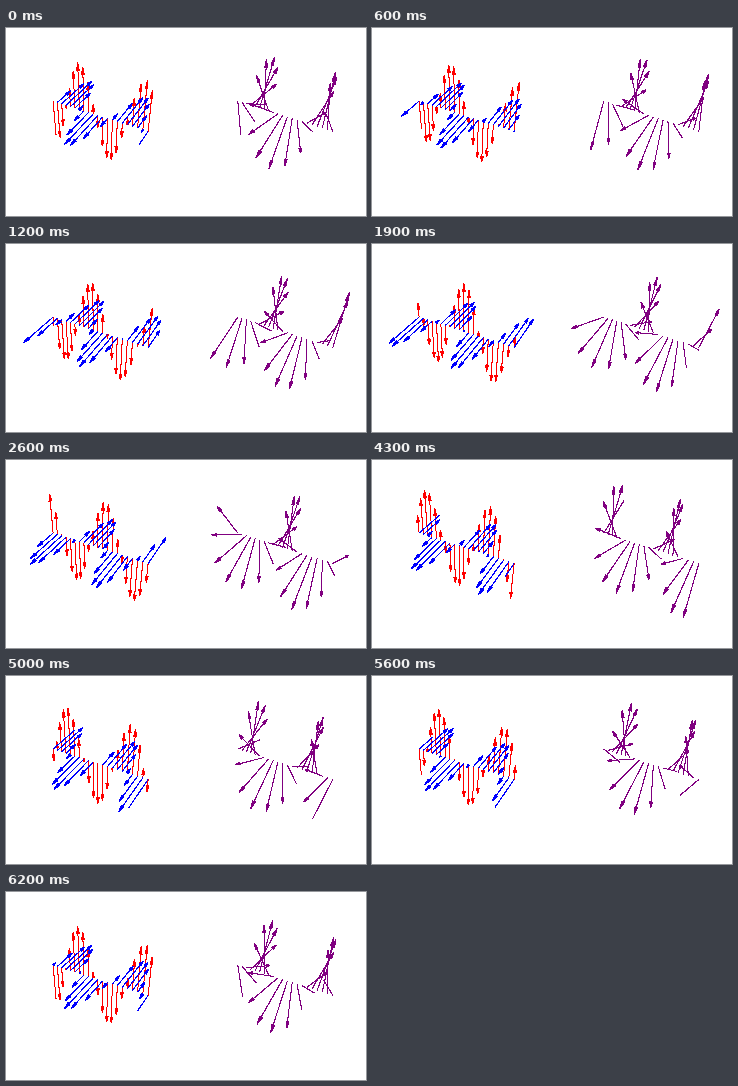
Recreate the animation shown at these times as a matplotlib script. Size 360 by 188 pixels, loop 6300 ms.

```python
import numpy as np
import matplotlib.pyplot as plt
from matplotlib.animation import FuncAnimation
from matplotlib.collections import PolyCollection

W, H, DPI = 360, 188, 100
FRAMES, INTERVAL = 63, 100
STATIONS = np.arange(0, 10.01, 0.5)
EYE = np.array([1.3, -2.4, 2.0])
SCALE = 364.5
LEFT, RIGHT, MIDDLE = 91.9, 276.6, 87.4
HEAD, HEAD_HALF = 0.145, 1.3
# Unsmoothed fills cover every pixel they touch, so a sliver is one pixel wide
SHAFT_HALF = 0.01

# Camera looking at the centre of a unit cube
DISTANCE = np.linalg.norm(EYE)
FORWARD = -EYE / DISTANCE
SIDE = np.cross(FORWARD, [0, 0, 1])
SIDE /= np.linalg.norm(SIDE)
UP = np.cross(SIDE, FORWARD)


def project(s, y, z, cx):
    p = np.array([s / 10 - 0.5, y / 2, z / 2])
    k = SCALE / (DISTANCE + FORWARD @ p)
    return np.array([cx + k * (SIDE @ p), MIDDLE - k * (UP @ p)])


def head_shown(s, y, z):
    # Heads on the two end faces are clipped when they lean out of the box
    if s == STATIONS[0] and y - z > 0.3:
        return False
    if s == STATIONS[-1] and y < -0.3 and z > y:
        return False
    # Heads pointing away from the eye are seen edge-on
    return not (y > 0.27 and z < -0.5)


def arrow(s, y, z, cx):
    """Polygons of the arrow standing at station s."""
    size = np.hypot(y, z)
    back = max(0, 1 - HEAD / max(size, 1e-9))
    tail = project(s, 0, 0, cx)
    neck = project(s, back * y, back * z, cx)
    tip = project(s, y, z, cx)
    d = tip - neck
    n = np.array([-d[1], d[0]]) / max(np.hypot(*d), 1e-9)
    a, b = n * SHAFT_HALF, n * HEAD_HALF * min(1, size / HEAD)
    parts = [[tail + a, neck + a, neck - a, tail - a]]
    if head_shown(s, y, z):
        parts.append([tip, neck + b, neck - b])
    return parts


fig = plt.figure(figsize=(W / DPI, H / DPI), dpi=DPI, facecolor="white")
ax = fig.add_axes([0, 0, 1, 1])
ax.set_xlim(0, W)
ax.set_ylim(H, 0)
ax.axis("off")


def arrows(color):
    group = PolyCollection([], facecolors=color, edgecolors="none",
                           linewidths=0, antialiaseds=False, snap=False)
    ax.add_collection(group, autolim=False)
    return group


vertical = arrows("#ff0000")
lateral = arrows("#0000ff")
total = arrows("#800080")


def draw(frame):
    reds, blues, purples = [], [], []
    for s in STATIONS:
        phase = s - frame * 0.1
        y, z = np.sin(phase), -np.cos(phase)
        reds += arrow(s, 0, z, LEFT)
        blues += arrow(s, y, 0, LEFT)
        purples += arrow(s, y, z, RIGHT)
    vertical.set_verts(reds)
    lateral.set_verts(blues)
    total.set_verts(purples)
    return []


anim = FuncAnimation(fig, draw, frames=FRAMES, interval=INTERVAL,
                     repeat=True, repeat_delay=0, blit=False)
plt.show()
```
